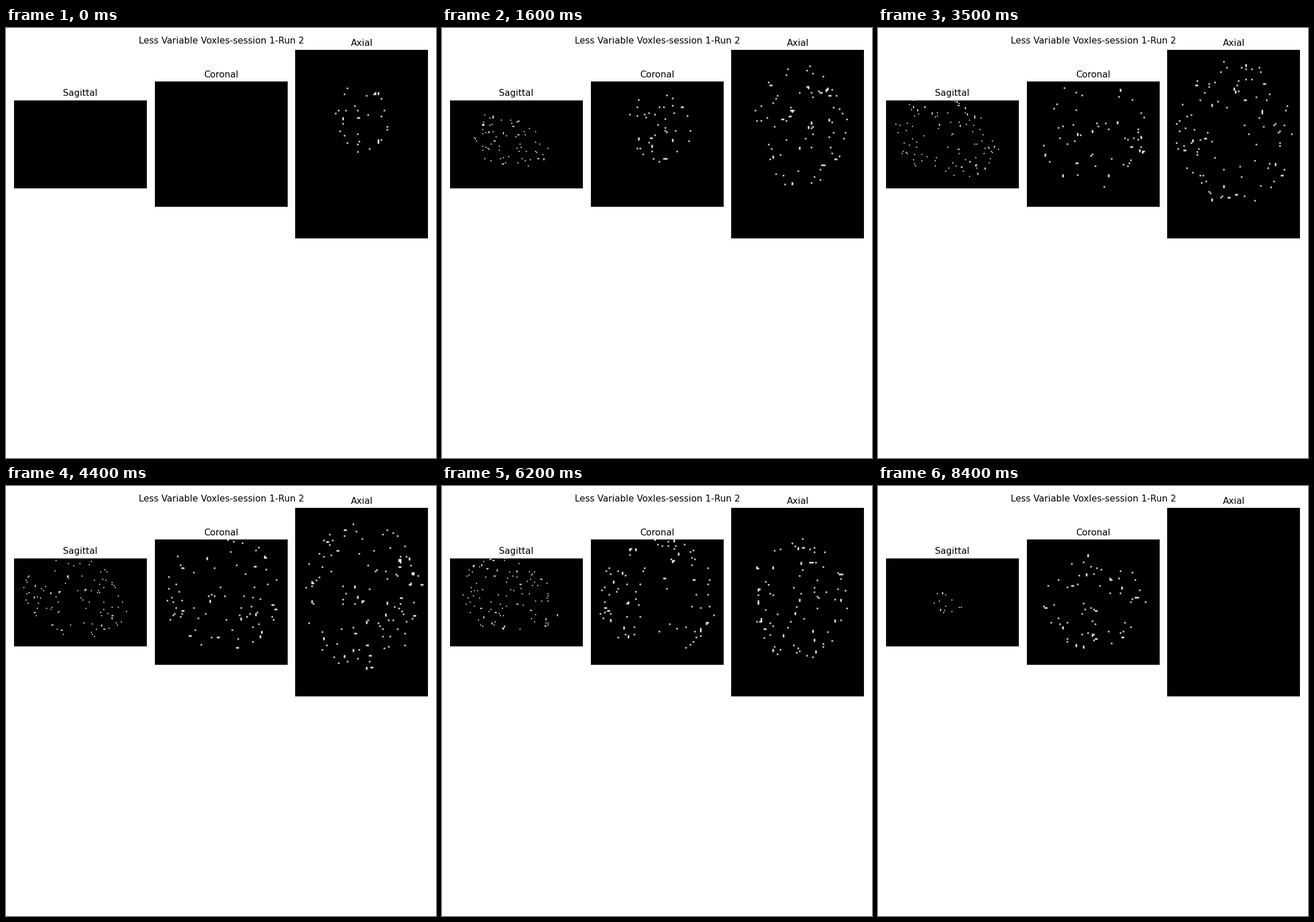
Write a matplotlib script that moves like this. It is 748 px wide and 748 px high and loops after 8.5 s.

```python
import numpy as np
import matplotlib.pyplot as plt
from matplotlib.animation import FuncAnimation

SIZE = 748
DPI = 93.5
NX, NY, NZ = 90, 128, 85
PAD = 14.025
MIDDLE = 202.2  # shared vertical centre of the panels, from the top

WIDEST = 43            # height where the head is widest
BELOW, ABOVE = 49, 34  # how far it reaches down and up from there
HALF_X, HALF_Y = 40.5, 50
CENTRE_X = 45


def make_volume():
    rng = np.random.default_rng(12)
    x, y, z = np.ogrid[:NX, :NY, :NZ]

    # Half ellipsoids below and above, leaning forward towards the base
    dz = (z - WIDEST) / np.where(z < WIDEST, BELOW, ABOVE)
    scale = np.sqrt(np.clip(1 - dz ** 2, 1e-6, 1))
    centre_y = np.minimum(46 + 0.3 * z, 61.5)
    r2 = (((x - CENTRE_X) / HALF_X) ** 2
          + ((y - centre_y) / HALF_Y) ** 2) / scale ** 2
    inside = (r2 <= 1) & (abs(dz) < 1)

    # Sparse voxels, denser near the rim
    seeds = inside & (rng.random(r2.shape) < 0.007 + 0.018 * r2)

    # Some voxels grow into short runs along an axis
    vol = seeds.copy()
    for axis in range(3):
        grow = seeds & (rng.random(r2.shape) < 0.12)
        vol |= np.roll(grow, 1, axis)
    return vol.astype(float)


def add_panel(col, title, cols, rows):
    width = (SIZE - 4 * PAD) / 3
    height = width * rows / cols
    left = PAD + col * (width + PAD)
    bottom = SIZE - MIDDLE - height / 2
    ax = fig.add_axes([v / SIZE for v in (left, bottom, width, height)])
    ax.set_title(title, fontsize=12, pad=5.7)
    ax.axis("off")
    return ax.imshow(np.zeros((rows, cols)), cmap="gray", vmin=0, vmax=1,
                     aspect="auto")


volume = make_volume()

plt.rcParams["font.family"] = "DejaVu Sans"
fig = plt.figure(figsize=(SIZE / DPI, SIZE / DPI), dpi=DPI, facecolor="white")
fig.suptitle("Less Variable Voxles-session 1-Run 2", fontsize=12, x=0.5007)
sagittal = add_panel(0, "Sagittal", NY, NZ)
coronal = add_panel(1, "Coronal", NX, NZ)
axial = add_panel(2, "Axial", NX, NY)


def show_slice(i):
    sagittal.set_data(volume[i].T)
    coronal.set_data(volume[:, i].T)
    axial.set_data(volume[:, :, i].T)
    return sagittal, coronal, axial


anim = FuncAnimation(fig, show_slice, frames=NZ, interval=100,
                     init_func=lambda: show_slice(0), repeat=True,
                     repeat_delay=0, blit=False)
plt.show()
```
